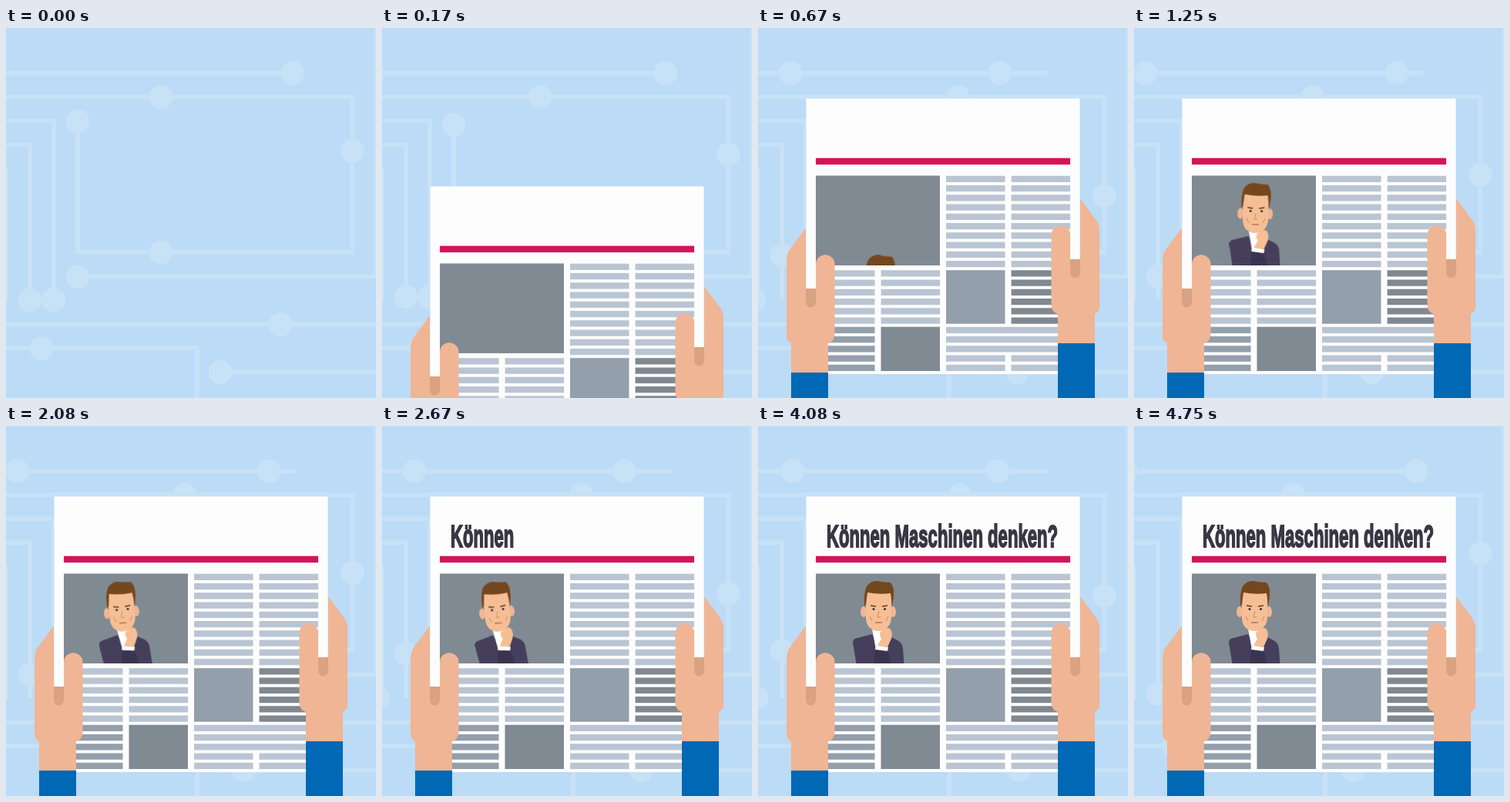
An HTML page without scripts for the animation above (4.83 s loop, 480 px wide and 480 px high).

```html
<!DOCTYPE html>
<html lang="de">
<head>
<meta charset="utf-8">
<title>Zeitung</title>
<style>
  html, body { margin: 0; width: 100%; height: 100%; overflow: hidden; background: #bbdbf6; }
  svg { display: block; width: 100vw; height: 100vh; }

  .wires { fill: none; stroke: #c7e1f6; stroke-width: 6; }
  .dots { fill: #c7e1f6; --x: 0; --y: 0; animation: slide 4830ms infinite; }
  .left { --x: -62px; }
  .right { --x: 62px; }
  .up { --y: -62px; }
  .down { --y: 62px; }

  .paper { animation: rise 4830ms infinite; }
  .rows { fill: none; stroke: #bac5d3; stroke-width: 76.5; stroke-dasharray: 8.2 4.05; }
  .wide { stroke-width: 161; }
  .mid { stroke: #939fab; }
  .dark { stroke: #808890; }

  .enter { animation: enter 4830ms infinite; }
  .tilt { transform-origin: 160px 308px; animation: tilt 4830ms ease-in-out infinite; }

  .title { font: bold 41px "Liberation Sans", Arial, sans-serif; fill: #393744; stroke: #393744; stroke-width: 2; }
  .title tspan { animation: 4830ms step-end infinite; }
  .w1 { animation-name: word1 !important; }
  .w2 { animation-name: word2 !important; }
  .w3 { animation-name: word3 !important; }

  /* back and forth, 833 ms each way */
  @keyframes slide {
    0%, 34.5%, 69.01% { transform: none; animation-timing-function: cubic-bezier(.5, 0, .5, 1); }
    17.25%, 51.76% { transform: translate(var(--x), var(--y)); animation-timing-function: cubic-bezier(.5, 0, .5, 1); }
    86.27% { transform: translate(var(--x), var(--y)); animation-timing-function: cubic-bezier(.528, 0, .607, .769); }
    100% { transform: translate(calc(var(--x) * .061), calc(var(--y) * .061)); }
  }
  @keyframes rise {
    0% { transform: translateY(400px); animation-timing-function: cubic-bezier(.333, 1, .667, 1); }
    10.35%, 100% { transform: none; }
  }
  @keyframes enter {
    0%, 13% { transform: translateY(120px); animation-timing-function: cubic-bezier(.333, 1, .667, 1); }
    24.2%, 100% { transform: none; }
  }
  @keyframes tilt {
    0%, 30% { transform: rotate(1deg); }
    47%, 58% { transform: rotate(-6deg); }
    69%, 100% { transform: rotate(0deg); }
  }
  @keyframes word1 { 0% { opacity: 0; fill-opacity: 0; stroke-opacity: 0; } 51.7%, 100% { opacity: 1; fill-opacity: 1; stroke-opacity: 1; } }
  @keyframes word2 { 0% { opacity: 0; fill-opacity: 0; stroke-opacity: 0; } 58.6%, 100% { opacity: 1; fill-opacity: 1; stroke-opacity: 1; } }
  @keyframes word3 { 0% { opacity: 0; fill-opacity: 0; stroke-opacity: 0; } 65.5%, 100% { opacity: 1; fill-opacity: 1; stroke-opacity: 1; } }
</style>
</head>
<body>
<svg viewBox="0 0 480 480">
  <defs>
    <clipPath id="frame"><rect x="75" y="191.5" width="161" height="116.5"/></clipPath>
    <g id="hand">
      <path fill="#0068b5" d="M43 446h48v100h-48z"/>
      <path fill="#f0b594" d="M62 259V338H75V306.5a12.25 12.25 0 0 1 24.5 0V396q0 11-8.5 13V447H43V409q-6-3-6-9V303q0-8 3-14Z"/>
      <path fill="#d9a283" d="M62 338h13v18a6.5 6.5 0 0 1-13 0Z"/>
    </g>
  </defs>

  <rect width="480" height="480" fill="#bbdbf6"/>

  <g class="wires">
    <path d="M0 58.5H375"/>
    <path d="M0 89.5H449.5V291H93V121"/>
    <path d="M0 120.5H62V353"/>
    <path d="M0 151.5H31V353"/>
    <path d="M0 181V355"/>
    <path d="M93 322.5H480V0"/>
    <path d="M0 384.5H480"/>
    <path d="M0 415H248V480"/>
    <path d="M278 446.500H480"/>
  </g>

  <g class="dots left">
    <circle cx="372" cy="58.500" r="15.5"/>
    <circle cx="356" cy="384.500" r="15.5"/>
  </g>
  <g class="dots right">
    <circle cx="-16" cy="58.500" r="15.5"/>
    <circle cx="201" cy="89.500" r="15.5"/>
    <circle cx="201" cy="291" r="15.5"/>
    <circle cx="93" cy="322.500" r="15.5"/>
    <circle cx="-63" cy="353" r="15.5"/>
    <circle cx="46" cy="415.500" r="15.5"/>
    <circle cx="278" cy="446.500" r="15.5"/>
  </g>
  <g class="dots up">
    <circle cx="31" cy="353" r="15.5"/>
    <circle cx="62" cy="353" r="15.5"/>
  </g>
  <g class="dots down">
    <circle cx="93" cy="121" r="15.5"/>
    <circle cx="449.500" cy="159.500" r="15.5"/>
  </g>

  <g class="paper">
    <rect x="62.5" y="91.500" width="355" height="357.500" fill="#fdfdfd"/>
    <rect x="75" y="168.700" width="330" height="8.500" fill="#d4145a"/>

    <g class="rows">
      <path d="M282.3 191.700V310.500M366.800 191.700V310.500"/>
      <path d="M113.300 314.200V384M197.800 314.200V384"/>
      <path class="dark" d="M366.800 314.200V384"/>
      <path class="mid" d="M113.300 387.700V445.500"/>
      <path class="wide" d="M324.500 387.700V421"/>
      <path d="M282.300 424.500V445.500M366.800 424.500V445.500"/>
    </g>
    <rect x="75" y="191.500" width="161" height="116.500" fill="#808a92"/>
    <rect x="244" y="314.200" width="76.500" height="69.500" fill="#939faa"/>
    <rect x="159.500" y="387.700" width="76.500" height="57.300" fill="#808a92"/>

    <g clip-path="url(#frame)">
      <g class="enter">
        <g class="tilt">
          <path fill="#463f5c" d="M131 330L123 281Q123 276 129 275L148 270L155 285L169 272L181 278Q187 281 188 288L191 330Z"/>
          <path fill="#fff" d="M148 263H165L163 276L153 290Z"/>
          <ellipse cx="137" cy="241" rx="4" ry="7" fill="#f0b594"/>
          <ellipse cx="175" cy="241" rx="4" ry="7" fill="#f0b594"/>
          <path fill="#f6be95" d="M140 214H173V248Q173 256 168 261Q163 266 156 266Q149 266 144 261Q140 256 140 248Z"/>
          <path fill="#75471e" d="M138 233Q137 217 141 208Q146 201 154 201Q164 203 172 203Q177 209 176 221L174 234L172 217Q157 219 142 216L140 232Z"/>
          <g fill="none" stroke="#5f3a20" stroke-width="1.6">
            <path d="M146 233L153 234M161 234L168 233"/>
            <path stroke="#c98d68" stroke-width="1" d="M157 240L155 248H159M145 247L148 253M169 247L166 253"/>
            <path stroke="#b0684c" stroke-width="1.300" d="M152 255H161"/>
          </g>
          <circle cx="150" cy="237.500" r="1.500" fill="#33303c"/>
          <circle cx="164.500" cy="237.500" r="1.500" fill="#33303c"/>
          <path fill="#3a3450" d="M152 290L168 292L180 330H148Z"/>
          <path fill="#fff" d="M153 284L169 287L168 292L152 290Z"/>
          <path fill="#f6be95" d="M155 285L160 276Q156 269 160 266L166 262Q171 261 173 266Q175 272 172 278L168 287Z"/>
        </g>
      </g>
    </g>

    <!-- condensed headline face -->
    <text class="title" transform="translate(89 157.300) scale(.54 1)"><tspan class="w1">Können</tspan> <tspan class="w2">Maschinen</tspan> <tspan class="w3">denken?</tspan></text>

    <use href="#hand"/>
    <use href="#hand" transform="translate(480 -38) scale(-1 1)"/>
  </g>
</svg>
</body>
</html>
```
